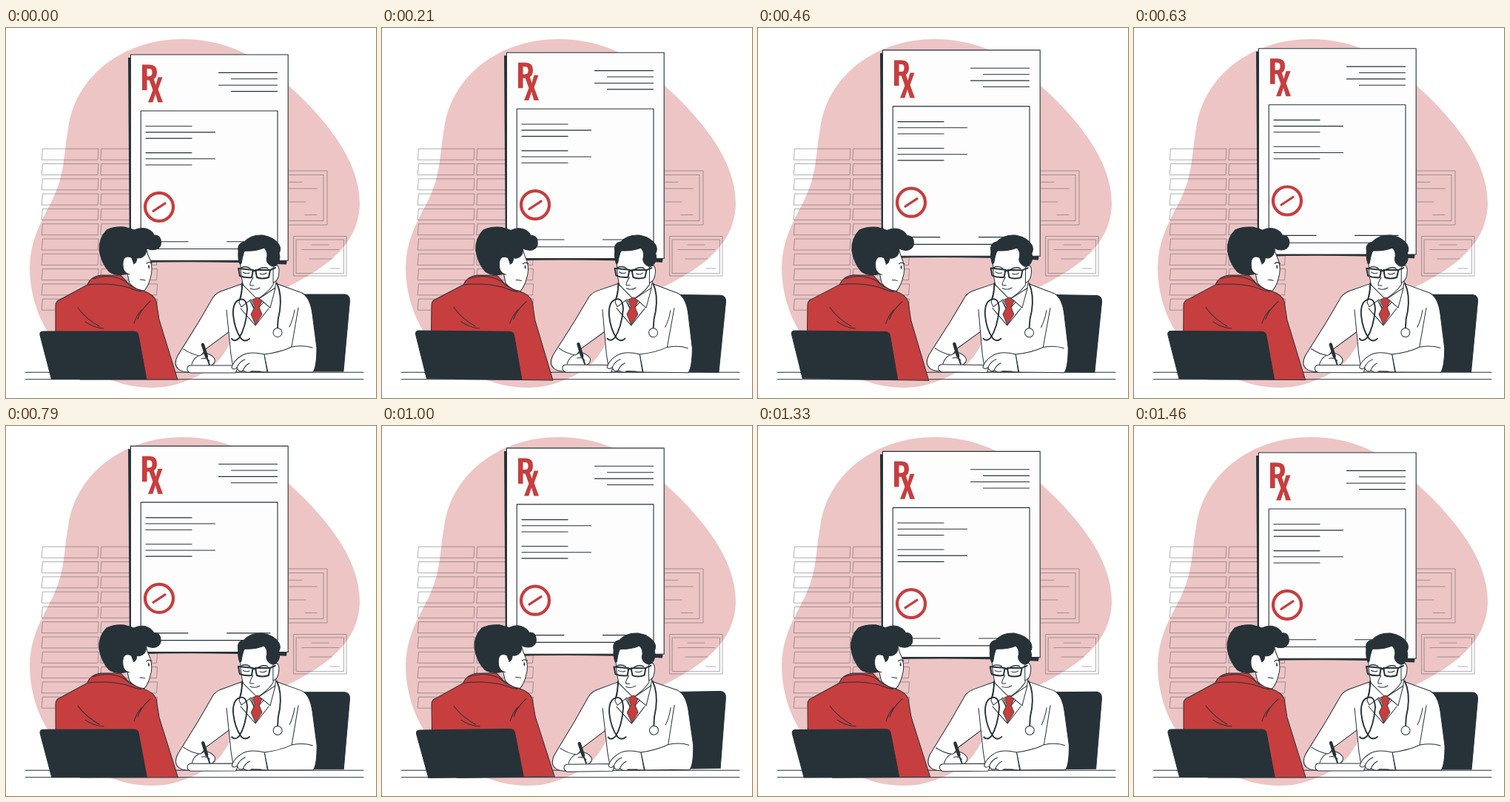
Write an HTML page with a canvas that moves like this. It is 500 px wide and 500 px high and loops after 1500 ms.

```html
<!DOCTYPE html>
<html lang="en">
<head>
<meta charset="utf-8">
<title>Doctor and patient</title>
<style>
  html, body { margin: 0; width: 100%; height: 100%; overflow: hidden; background: #fff; }
  canvas { display: block; width: 100vw; height: 100vh; }
</style>
</head>
<body>
<canvas id="stage"></canvas>
<script>
const SIZE = 500, LOOP = 1500, FPS = 24;
const INK = '#263238', RED = '#c73e3e', PINK = '#edc5c5', WHITE = '#fff';
const FAINT = 'rgba(38,50,56,.42)';

const canvas = document.getElementById('stage');
const ratio = window.devicePixelRatio || 1;
canvas.width = canvas.height = SIZE * ratio;
const ctx = canvas.getContext('2d');
ctx.scale(ratio, ratio);
ctx.lineCap = ctx.lineJoin = 'round';

const paths = {};
function shape(d, fill, stroke = INK, width = 1) {
  const path = paths[d] || (paths[d] = new Path2D(d));
  if (fill) { ctx.fillStyle = fill; ctx.fill(path, 'evenodd'); }
  if (stroke) { ctx.strokeStyle = stroke; ctx.lineWidth = width; ctx.stroke(path); }
}
const line = (d, width = 1, color = INK) => shape(d, null, color, width);
const rule = (x1, x2, y, color = INK, width = 1.1) => line(`M${x1} ${y}H${x2}`, width, color);
const box = (x1, y1, x2, y2, fill, stroke, width) =>
  shape(`M${x1} ${y1}H${x2}V${y2}H${x1}Z`, fill, stroke, width);

function disc(x, y, r, fill, stroke, width) {
  ctx.beginPath();
  ctx.arc(x, y, r, 0, Math.PI * 2);
  if (fill) { ctx.fillStyle = fill; ctx.fill(); }
  if (stroke) { ctx.strokeStyle = stroke; ctx.lineWidth = width; ctx.stroke(); }
}

function moved(dy, draw) {
  ctx.save();
  ctx.translate(0, dy);
  draw();
  ctx.restore();
}

function turned(degrees, x, y, draw) {
  ctx.save();
  ctx.translate(x, y);
  ctx.rotate(degrees * Math.PI / 180);
  ctx.translate(-x, -y);
  draw();
  ctx.restore();
}

function drawBackdrop() {
  shape('M238 15C303 15 348 44 381 77C430 121 478 178 478 236C478 290 436 324 372 354' +
    'C325 376 317 400 303 425C290 452 272 466 248 475C230 483 214 486 196 486' +
    'C148 486 104 461 74 432C44 403 32 358 32 324C33 277 55 252 68 220' +
    'C80 190 79 160 84 136C94 62 162 15 238 15Z', PINK, null);
  for (let row = 0; row < 11; row++) {
    const y = 163.2 + row * 20.3;
    for (const x of [49, 128.5])
      shape(`M${x + .8} ${y}H${x + 76}L${x + 75} ${y + 15}H${x - .4}Z`, null, FAINT, .9);
  }
  box(340, 193, 434, 266, null, FAINT, .9);
  box(345, 198.5, 429, 260.5, null, FAINT, .9);
  for (const [a, b, y] of [[370, 400, 208.3], [370, 420, 217], [370, 405, 235], [404, 420, 252.5]])
    rule(a, b, y, FAINT, .9);
  box(389, 281.5, 460, 335, null, FAINT, .9);
  box(392.5, 286, 456.5, 331.5, null, FAINT, .9);
  for (const [a, b, y] of [[413, 436, 293], [400, 450, 299.5], [410, 440, 312], [438, 451, 325]])
    rule(a, b, y, FAINT, .9);
}

function drawPrescription() {
  shape('M165 40H180V300H381L379 319.5Q270 314 167 317.5Z', INK, null);
  box(168.4, 36, 381.2, 314.3, '#fdfdfd', INK, 1.1);
  shape('M184 49.5H194Q204 49.5 204 59.5Q204 67 199.5 69L205 84H198.5' +
    'L193.7 70.5H190.5V84H184ZM190.5 55V65.2H193.5Q197.6 65.2 197.6 60Q197.6 55 193.5 55Z', RED, null);
  shape('M192.5 66.5H199L202.3 77.5L205.5 66.5H211.5L205.5 83L212 100.5H205.3' +
    'L202 89L198.3 100.5H192L198.8 83Z', RED, null);
  for (let i = 0; i < 4; i++) rule(i % 2 ? 304.5 : 287.5, 366.5, 60.4 + i * 8.4);
  box(182.2, 112, 367, 298.5, null, INK, 1.1);
  for (const top of [132.7, 168.6])
    [251, 282.5, 251].forEach((end, i) => rule(189, end, top + i * 8.2));
  disc(207, 241.8, 19, null, RED, 4.2);
  line('M199 247.3L215 236.8', 3.2, RED);
  rule(197, 246, 288.7);
  rule(298.5, 357, 288.7);
}

function drawDesk() {
  rule(26.5, 483, 465.2);
  rule(26.5, 483, 474.7);
}

function drawPatient() {
  // jacket
  shape('M67 420V375Q67 369 73 367L110 347Q114 336 128 334H155L168 348L185 355' +
    'Q200 360 203 369L207 394L232 475H100Z', RED);
  line('M110 347Q139 344 163 350Q176 355 183 356');
  line('M117 339Q139 331 159 341Q170 350 183 355');
  line('M97 378Q109 394 126 403');
  line('M107 397Q118 405 132 406');
  line('M195 369Q181 382 178 393');
  line('M183 381Q176 389 173 399');
  // face and neck
  shape('M161 306L175 300L189 296Q191 306 195 314Q199 326 195 338Q193 347 187 355' +
    'Q175 354 167 345L164 332Z', WHITE);
  line('M190 318Q193 315 197 318', 1.3);
  shape('M192.8 320.5Q194.6 322 193.2 325Q191.4 323 192.8 320.5Z', INK, INK, .6);
  line('M181 340Q185 340 188 341');
  // hair, with the ear left open towards the face
  shape('M165 332Q149 336 139 329Q129 318 126 301Q125 284 136 273Q146 268 160 269' +
    'Q168 271 173 273Q181 269 189 271Q198 274 200 280Q207 279 209 286Q211 296 203 299' +
    'Q196 301 189 297Q191 305 185 309Q180 312 177 310Q177 317 172 319L167 309Z', INK);
  shape('M169 310Q159 306 158 317Q157 331 167 333L172 328V318Z', WHITE, null);
  line('M169 310Q159 306 158 317Q157 331 167 333');
  // chair back
  shape('M46 415Q45 410 51 410H172Q178 410 179 415L190 474.5H61.5Z', INK);
}

function drawStethoscope() {
  line('M319 345Q319 360 316 367Q306 370 307 388Q309 408 318 420Q323 425 329 420', 1.9);
  line('M316 367Q325 364 326 380Q324 405 315 419Q309 425 305 420', 1.9);
  line('M366 345Q373 360 370 382Q367 393 367 405', 1.9);
  disc(367, 411.5, 6, WHITE, INK, 1);
}

function drawDoctorHead() {
  shape('M321 338L320 351L337 383L363 354L366 337Z', WHITE);
  shape('M317 309Q316 328 320 346Q324 361 338 367Q352 360 361 347L366 314L350 294L325 298Z', WHITE);
  shape('M361 323Q368 317 369 327Q369 342 361 344Z', WHITE);
  shape('M316 319Q313 311 314 302Q312 291 322 289Q331 279 347 280Q363 283 369 293' +
    'Q372 299 369 304Q372 314 365 321L360 322Q352 319 352 312Q355 304 349 297' +
    'Q337 302 322 301Q319 310 318 318Z', INK);
  line('M318 324Q324 321 330 325M341 326Q349 322 354 325', 1.4);
  line('M320 330Q325 333 329 331M343 332Q348 334 352 331');
  shape('M314 325L334 327L332 337Q323 338 316 335ZM337 327H357L355 337Q346 340 339 337Z' +
    'M333 329Q336 327 338 329M357 327L364 324', null, INK, 2);
  line('M334 337Q329 345 330 348L335 348');
  line('M330 352Q337 355 343 351');
}

function drawHands() {
  // writing hand
  shape('M244 442L262 443L269 439Q278 441 282 447Q284 453 276 457H244Z', WHITE, null);
  line('M240 434Q250 441 262 443L269 439Q278 441 282 447Q284 453 276 457');
  line('M260 443Q253 447 251 455M264 447Q270 445 275 450');
  shape('M245 459Q246 456 250 456H311Q314 461 310 466H249Q244 464 245 459Z', WHITE);
  line('M266 428L271 444', 4.4);
  line('M271 444L275 455', 2);
  // resting hand
  shape('M349 441Q329 436 318 443Q307 450 305 459Q308 463 312 459Q314 466 321 463' +
    'Q326 467 332 464L353 465Z', WHITE);
  line('M312 459Q316 450 323 448M320 463Q323 456 329 453M331 464H344');
}

function drawDoctor() {
  shape('M396 360H458Q465 361 464.5 369L456 464H400Z', INK);
  // writing arm, then the body of the coat
  shape('M290 356Q281 360 278 367L260 398L232 443Q226 455 233 461Q238 465 247 465' +
    'L270 434L301 411Z', WHITE);
  shape('M318 346L290 356L284 379L301 411L304 441L308 465H415' +
    'Q420 458 420 432L414 386Q411 364 400 358L367 346Z', WHITE, null);
  line('M318 346L290 356M301 411L304 441L308 465H415Q420 458 420 432L414 386Q411 364 400 358L367 346');
  line('M298 381L301 411');
  line('M349 441Q372 438 386 431L395 378M386 431Q402 428 414 432');
  line('M349 441L354 465M390 381Q388 394 383 404');
  drawDoctorHead();
  // collar and tie
  shape('M320 347L315 371L318 377L331 367L337 384L344 367L357 378L364 351L340 367Z', WHITE);
  line('M317 379L337 402L355 379');
  shape('M333 367L340 364L346 369L342 377L346 387L337 401L331 387L336 377Z', RED, INK, .8);
  drawStethoscope();
  drawHands();
}

function render(now) {
  // Drawn on a 24 fps beat, sampled in the middle of each step.
  const step = Math.floor((now % LOOP) * FPS / 1000 + .1);
  const phase = (step + .5) / (LOOP * FPS / 1000) % 1;
  const lift = -10 * (1 - Math.abs(1 - 2 * phase));
  const sway = phase < .25 ? 4 * phase : phase < .75 ? 2 - 4 * phase : 4 * phase - 4;

  ctx.fillStyle = WHITE;
  ctx.fillRect(0, 0, SIZE, SIZE);
  drawBackdrop();
  moved(lift + .3, drawPrescription);
  drawDesk();
  turned(sway, 347, 373, drawDoctor);
  turned(sway, 139, 372, drawPatient);
}

let start;
function tick(now) {
  if (start === undefined) start = now;
  render(now - start);
  requestAnimationFrame(tick);
}
render(0);
requestAnimationFrame(tick);
</script>
</body>
</html>
```
